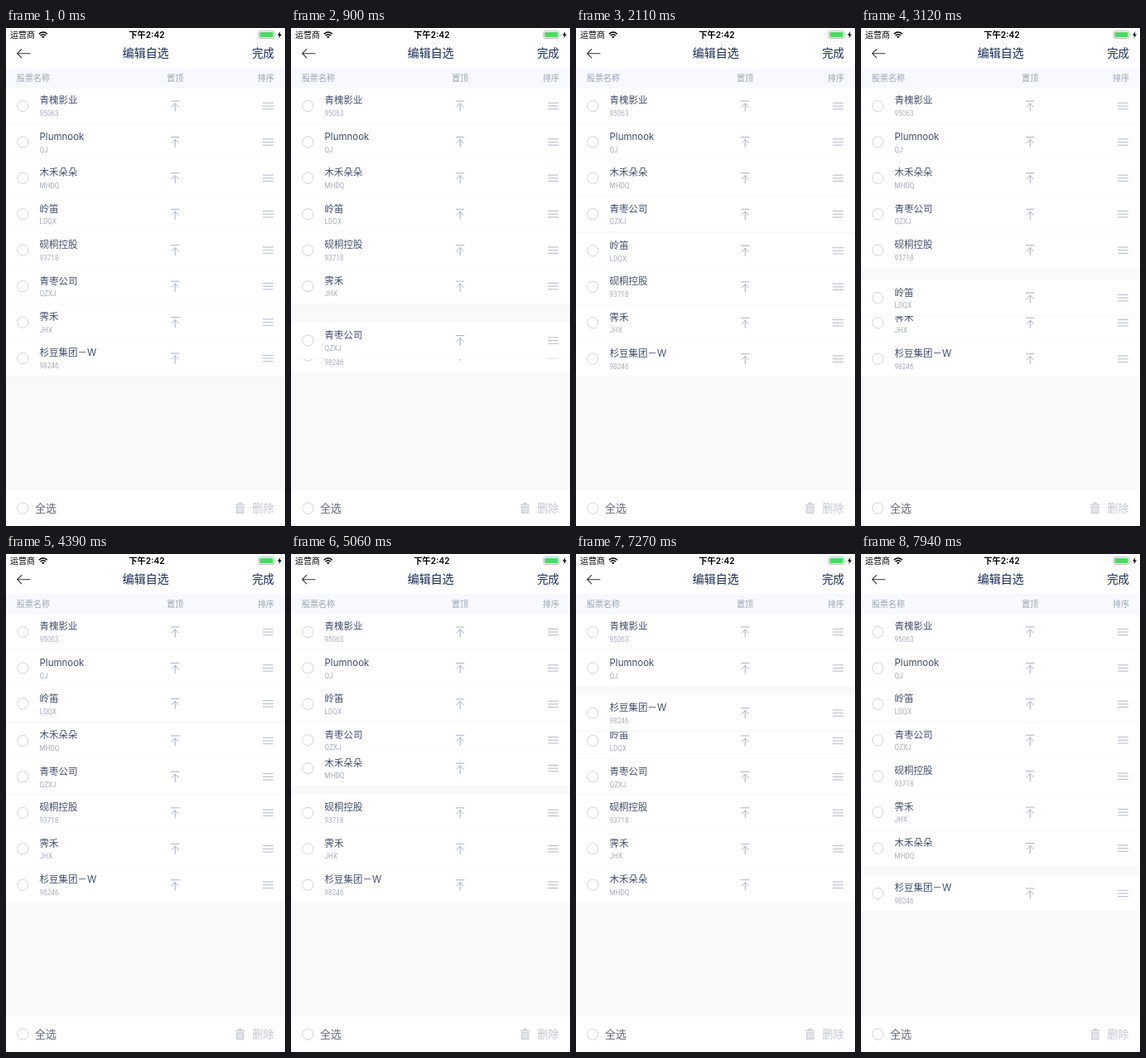
Write an HTML page that moves like this. It is 337 by 600 pixels and loops after 8000 ms.

```html
<!DOCTYPE html>
<html lang="zh-CN">
<head>
<meta charset="utf-8">
<style>
  html, body { margin: 0; width: 100%; height: 100%; overflow: hidden; background: #fff; }
  svg { display: block; width: 337px; height: 600px; }
  text { font-family: Inter, "Noto Sans CJK SC", "Noto Sans CJK", sans-serif; }
  .line { fill: none; stroke-linecap: round; stroke-linejoin: round; }
  .name { font-size: 11.5px; fill: #434e6b; }
  .code { font: 8.2px Roboto, sans-serif; fill: #a8adb9; }
  .head { font-size: 10px; fill: #99a3b3; }
  .nav { fill: #1b2e5a; }
  .ring { fill: #fff; stroke: #d3d4d8; }
  .lifted { filter: drop-shadow(0 0 .6px rgba(60, 70, 100, .07)); }
</style>
</head>
<body>
<svg viewBox="0 0 337 600">
  <rect width="337" height="600" fill="#fff"/>
  <rect y="72" width="337" height="486" fill="#f9f9fa"/>
  <g id="list"></g>
  <rect y="48" width="337" height="24.4" fill="#f7f9fe"/>

  <!-- status bar -->
  <text x="5" y="12" font-size="10">运营商</text>
  <g class="line" stroke="#000" stroke-width="1.5" style="stroke-linecap:butt">
    <path d="M39.8 7.2Q44.8 2.8 49.8 7.2M41.6 9.1Q44.8 6.3 48 9.1"/>
  </g>
  <path d="M43 10.4Q44.8 9 46.6 10.4L44.8 12.3Z"/>
  <text x="170" y="12" font-size="10.3" font-weight="600" text-anchor="middle">下午2:42</text>
  <rect x="305" y="3.6" width="19" height="9" rx="2.4" fill="none" stroke="#a9a9a9" stroke-width=".8"/>
  <rect x="306.4" y="5" width="16.2" height="6.2" rx="1.2" fill="#4cd964"/>
  <path d="M325.2 6.7q1.5 1.4 0 2.8z" fill="#a9a9a9"/>
  <path d="M331.4 4L328 8.7h2.2l-.8 3.6 3.6-4.8h-2.3z"/>

  <!-- navigation -->
  <path class="line" d="M29 30.7H13.6M18.8 25.6L13.6 30.7L18.8 35.8" stroke="#333" stroke-width="1.1"/>
  <text class="nav" x="168.7" y="35" font-size="14" text-anchor="middle">编辑自选</text>
  <text class="nav" x="324" y="35" font-size="13.4" text-anchor="end">完成</text>
  <text class="head" x="13" y="64">股票名称</text>
  <text class="head" x="204.3" y="64" text-anchor="middle">置顶</text>
  <text class="head" x="324" y="64" text-anchor="end">排序</text>

  <!-- toolbar -->
  <rect y="557.6" width="337" height="43" fill="#fff"/>
  <circle class="ring" cx="20.3" cy="578.6" r="6.6"/>
  <text x="35" y="583" font-size="13" fill="#686d79">全选</text>
  <path d="M277 573.6h11.6v1.6H277zM280.5 571.6h4.6v2h-4.6zM278 576h9.6v9.2H278z" fill="#d3d5da"/>
  <path d="M280.6 577.4v6M282.8 577.4v6M285 577.4v6" stroke="#fff" stroke-width=".8"/>
  <text x="323.4" y="583" font-size="13" fill="#c2c5cc" text-anchor="end">删除</text>
</svg>
<script>
const LOOP = 8000, FIRST = 94, STEP = 43.43, LAST = 7;
const SWAP_MS = 100, SAMPLE_MS = 10;

const stocks = [
  ['青槐影业', '95063'], ['Plumnook', 'QJ'], ['木禾朵朵', 'MHDQ'], ['岭笛', 'LDQX'],
  ['砚桐控股', '93718'], ['青枣公司', 'QZXJ'], ['霁禾', 'JHX'], ['杉豆集团－W', '98246'],
];

// path: [ms, row centre]; bias shifts the point where neighbours make room
const drags = [
  { row: 5, bias: 0, path: [[450, 311.2], [1130, 400], [1260, 400], [1510, 337], [2100, 224.3]] },
  { row: 3, bias: 0, path: [[2620, 267.7], [3120, 325], [3360, 352], [3560, 330], [4100, 180.4]] },
  { row: 2, bias: .2, path: [[4790, 224.3], [5060, 258], [5530, 364], [5720, 398]] },
  { row: 7, bias: -.4, path: [[6270, 354.6], [6540, 336], [7070, 209], [7220, 186], [7720, 396], [7950, 409]] },
];

const list = document.getElementById('list');
const rows = stocks.map(([name, code]) => {
  const g = document.createElementNS('http://www.w3.org/2000/svg', 'g');
  g.innerHTML = `
    <rect y="-21.7" width="337" height="43.45" fill="#fff"/>
    <rect y="21.1" width="337" height=".7" fill="#f4f5f7"/>
    <circle class="ring" cx="20.3" r="6.6"/>
    <text class="name" x="40.5" y="-2.6">${name}</text>
    <text class="code" x="40.5" y="12.2">${code}</text>
    <path class="line" d="M199.5 -6H209M204.3 6V-3M200.2 1L204.3 -3L208.4 1" stroke="#a9b0c5"/>
    <path class="line" d="M310.5 -3.7H322.5M310.5 0H322.5M310.5 3.7H322.5" stroke="#b4b9c8"/>`;
  return list.appendChild(g);
});

// Monotone cubic through the path points
function pathY(path, t) {
  const end = path.length - 1;
  if (t <= path[0][0]) return path[0][1];
  if (t >= path[end][0]) return path[end][1];
  const i = path.findIndex(p => p[0] > t) - 1;
  const slope = k => (path[k + 1][1] - path[k][1]) / (path[k + 1][0] - path[k][0]);
  const tangent = k => {
    if (k === 0 || k === end) return 0;
    const a = slope(k - 1), b = slope(k);
    return a * b > 0 ? 2 * a * b / (a + b) : 0;
  };
  const [t0, y0] = path[i], [t1, y1] = path[i + 1];
  const h = t1 - t0, u = (t - t0) / h, v = 1 - u;
  return y0 * v * v * (1 + 2 * u) + y1 * u * u * (3 - 2 * u)
    + h * u * v * (tangent(i) * v - tangent(i + 1) * u);
}

function gapAt({ path, bias }, t) {
  const slot = Math.round((pathY(path, t) - FIRST) / STEP + bias);
  return Math.max(0, Math.min(LAST, slot));
}

let order = stocks.map((_, i) => i);
for (const drag of drags) {
  drag.others = order.filter(i => i !== drag.row);
  order = [...drag.others];
  order.splice(gapAt(drag, LOOP), 0, drag.row);
}

function draw(now) {
  const t = now % LOOP;
  const drag = drags.findLast(d => d.path[0][0] <= t) || drags[0];
  const active = t >= drags[0].path[0][0];
  const place = (i, y) => rows[i].setAttribute('transform', `translate(0 ${y.toFixed(2)})`);

  const gaps = [];
  for (let ms = 0; ms < SWAP_MS; ms += SAMPLE_MS) gaps.push(gapAt(drag, t - ms));
  drag.others.forEach((row, j) => {
    const pushed = gaps.filter(gap => j >= gap).length / gaps.length;
    place(row, FIRST + j * STEP + pushed * (STEP + (active ? .7 : 0)));
  });

  const top = rows[drag.row];
  place(drag.row, pathY(drag.path, t));
  if (list.lastChild !== top) list.appendChild(top);
  rows.forEach(g => g.classList.toggle('lifted', active && g === top));
  requestAnimationFrame(() => draw(performance.now()));
}
draw(performance.now());
</script>
</body>
</html>
```
